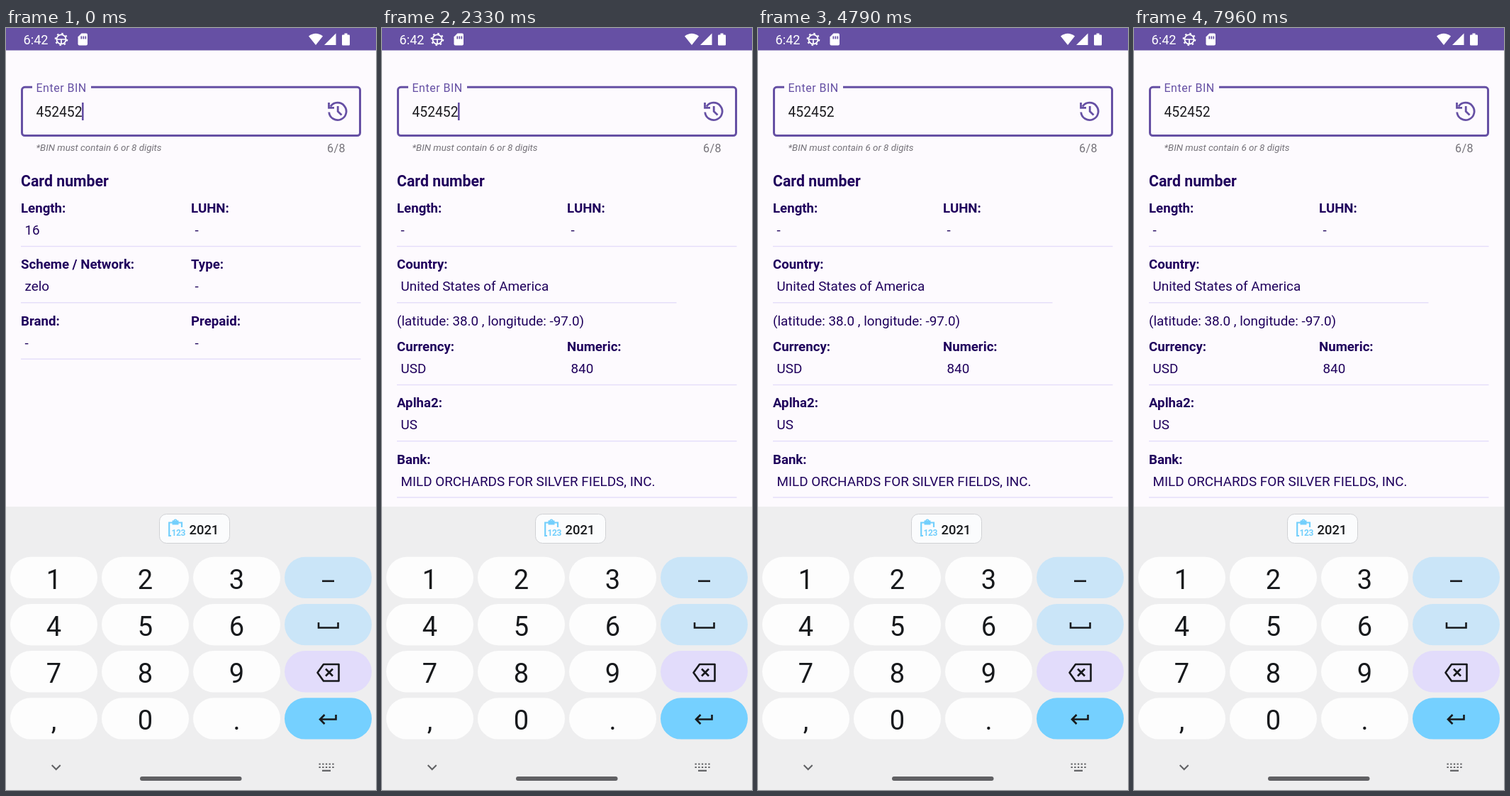
An HTML page that plays this animation: 522x1073 px, repeating every 8 s.

```html
<!DOCTYPE html>
<html lang="en">
<head>
<meta charset="utf-8">
<title>BIN lookup</title>
<style>
  html, body { margin: 0; width: 100%; height: 100%; overflow: hidden; background: #fdfafe; }
  svg { display: block; width: 100vw; height: 100vh; }
  text { font-family: Roboto, sans-serif; white-space: pre; }
  .label { font-weight: 700; font-size: 18.67px; fill: #1f005c; }
  .value { font-size: 18.85px; fill: #1f005c; }
  .digit { font-size: 38px; fill: #17191c; text-anchor: middle; }
  .line { fill: none; stroke-linejoin: miter; }
</style>
</head>
<body>
<svg id="stage" viewBox="0 0 522 1073" preserveAspectRatio="none">
  <rect width="522" height="1073" fill="#fdfafe"/>

  <!-- status bar -->
  <rect width="522" height="31.5" fill="#6650a4"/>
  <g fill="#fff">
    <text x="24.5" y="23" font-size="18.2">6:42</text>
    <g class="line" stroke="#fff">
      <circle cx="78" cy="16" r="6.6" stroke-width="1.8"/>
      <circle cx="78" cy="16" r="8.3" stroke-width="2" stroke-dasharray="2.5 4.02"/>
      <path d="M72 16H84M78 16V22" stroke-width="1.7"/>
    </g>
    <path d="M106.5 7.5H113Q115 7.5 115 9.5V22.5Q115 24.5 113 24.5H103.500Q101.500 24.500 101.500 22.500V12.500Z"/>
    <path d="M105.500 11.500h1.700v4h-1.700zm3 0h1.700v4h-1.700zm3 0h1.700v4h-1.700z" fill="#6650a4"/>
    <path d="M427 11.500Q437 4 447 11.500L437 24Z"/>
    <path d="M465.500 7.500V24H449Z"/>
    <path d="M477.500 7.500h4v2h2.200q1.300 0 1.300 1.300v12.400q0 1.300-1.300 1.300h-8.400q-1.300 0-1.300-1.300V10.800q0-1.300 1.300-1.300h2.200z"/>
  </g>

  <!-- input field -->
  <rect x="22.500" y="83.300" width="477" height="68.200" rx="4" fill="none" stroke="#6650a4" stroke-width="3"/>
  <rect x="37" y="80" width="83" height="8" fill="#fdfafe"/>
  <text x="42.500" y="89.500" font-size="16" letter-spacing=".5" fill="#6650a4">Enter BIN</text>
  <text x="42.500" y="124.500" font-size="19.3" fill="#1c1b1f">452452</text>
  <rect id="caret" x="107" y="105" width="2.600" height="25" fill="#6650a4"/>
  <g class="line" stroke="#6650a4" stroke-width="2.800">
    <path d="M455.700 118.500A12.200 12.200 0 1 0 457.800 110.500"/>
    <path d="M455.500 105V112.400H463M468.200 110V117.500L473.500 122.500"/>
  </g>
  <text x="42.500" y="172.500" font-size="13.4" font-style="italic" fill="#757279">*BIN must contain 6 or 8 digits</text>
  <text x="453" y="175" font-size="16" letter-spacing=".5" fill="#757279">6/8</text>

  <!-- results -->
  <text x="21" y="223" font-size="21.3" font-weight="700" fill="#1f005c">Card number</text>
  <g id="pending"></g>
  <g id="loaded"></g>

  <!-- keyboard -->
  <rect y="674" width="522" height="399" fill="#eeeeef"/>
  <rect x="216.500" y="684.500" width="99" height="41" rx="10" fill="#fbfcfd" stroke="#d0d1d4"/>
  <g class="line" stroke="#73cffc" stroke-width="2.200">
    <path d="M233 715H230.200V696.500H248V703"/>
    <path d="M234.500 693.500h9v6h-9z" fill="#73cffc" stroke="none"/>
    <circle cx="239" cy="694" r="1.800" stroke-width="1.500"/>
  </g>
  <text x="233.500" y="715" font-size="12" font-weight="700" letter-spacing="-.4" fill="#73cffc">123</text>
  <text x="258.500" y="712.800" font-size="18.4" font-weight="500" fill="#17191c">2021</text>
  <g id="keys"></g>
  <g class="line" stroke="#17191c" stroke-width="2.600">
    <path d="M446 778.800H463"/>
    <path d="M441 837V844.500H468.500V837"/>
    <path d="M448 896H469.500V919.500H448L439.500 907.700Z" stroke-linejoin="round"/>
    <path d="M451 902.500L461 912.500M461 902.500L451 912.500"/>
    <path d="M465.500 967V973.500H443.500M449.500 967L443 973.500L449.500 980"/>
  </g>
  <path class="line" d="M64.700 1038L70.700 1044L76.700 1038" stroke="#5f6063" stroke-width="2"/>
  <g class="line" stroke="#5f6063" stroke-width="2.200">
    <path d="M441.500 1036.500H463M441.500 1041H463" stroke-dasharray="2.300 2.400"/>
    <path d="M446 1045.800H458"/>
  </g>
  <rect x="189" y="1054" width="143.500" height="6" rx="3" fill="#606063"/>
</svg>
<script>
const $ = id => document.getElementById(id);
const LOOP = 8000;
const LOADED_AT = 375;
const CARET_ON = [[0, 500], [1325, 1830], [2325, 2830], [3375, 3830],
                  [4290, 4785], [5290, 5790], [6290, 6790], [7290, 7790]];

const text = (cls, x, y, s) => `<text class="${cls}" x="${x}" y="${y}">${s}</text>`;
const rule = (y, right = 500.5) =>
  `<rect x="21" y="${y - 0.7}" width="${right - 21}" height="1.4" fill="#e4ddfa"/>`;

// A row holds up to two label/value pairs above a divider.
const row = (y, pairs, right) => pairs.map(([label, value], i) =>
  text('label', 21 + i * 240, y, label) + text('value', 26.5 + i * 240, y + 31, value)
).join('') + rule(y + 47.5, right);

$('pending').innerHTML =
  row(260, [['Length:', '16'], ['LUHN:', '-']]) +
  row(339.3, [['Scheme / Network:', 'zelo'], ['Type:', '-']]) +
  row(418.6, [['Brand:', '-'], ['Prepaid:', '-']]);

$('loaded').innerHTML =
  row(260, [['Length:', '-'], ['LUHN:', '-']]) +
  row(339.3, [['Country:', 'United States of America']], 415.5) +
  text('value', 21, 418.6, '(latitude: 38.0 , longitude: -97.0)') +
  row(455, [['Currency:', 'USD'], ['Numeric:', '840']]) +
  row(534.2, [['Aplha2:', 'US']]) +
  row(613.5, [['Bank:', 'MILD ORCHARDS FOR SILVER FIELDS, INC.']]);

const sideFills = ['#cae5f8', '#cae5f8', '#e2dcfb', '#75d0ff'];
$('keys').innerHTML = ['123', '456', '789', ',0.'].map((chars, r) => {
  const y = 744.7 + r * 66.2;
  return [0, 1, 2, 3].map(c => {
    const x = 6 + c * 129;
    const fill = c < 3 ? '#fdfdfd' : sideFills[r];
    return `<rect x="${x}" y="${y}" width="123" height="58.3" rx="29.1" fill="${fill}"/>` +
      (c < 3 ? text('digit', x + 61.5, y + 45, chars[c]) : '');
  }).join('');
}).join('');

const show = (id, on) => $(id).setAttribute('visibility', on ? 'visible' : 'hidden');

function draw(t) {
  show('pending', t < LOADED_AT);
  show('loaded', t >= LOADED_AT);
  show('caret', CARET_ON.some(([from, to]) => t >= from && t < to));
}

let start;
function tick(now) {
  start ??= now;
  draw((now - start) % LOOP);
  requestAnimationFrame(tick);
}
draw(0);
requestAnimationFrame(tick);
</script>
</body>
</html>
```
